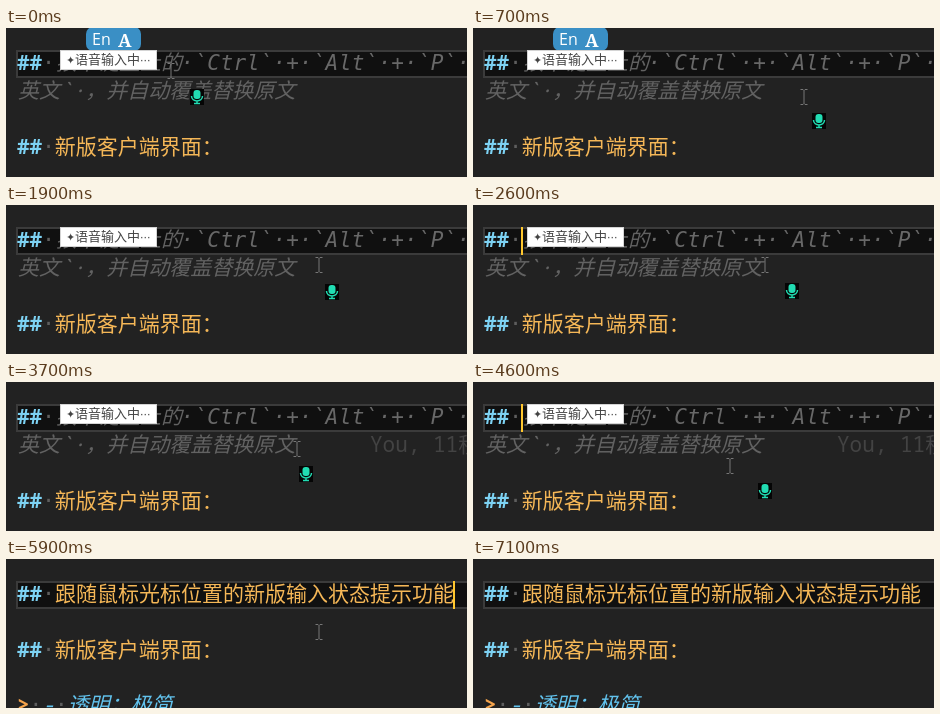
These frames come from a looping animation (461x149 px, 7.2 s). An HTML page:

```html
<!DOCTYPE html>
<html lang="zh-CN">
<head>
<meta charset="utf-8">
<title>Voice input status</title>
<style>
  html, body { margin: 0; width: 100%; height: 100%; overflow: hidden; background: #222; }
  svg { display: block; width: 461px; height: 149px; }
  text { font: 21px "Noto Sans Mono", "Noto Sans CJK SC", "Noto Sans Mono CJK SC", monospace; white-space: pre; }
  .mark { font-weight: bold; fill: #7dd2f3; }
  .dot { font-family: "DejaVu Sans Mono", monospace; fill: #5e5e5e; }
  .head { fill: #f5b757; }
  .note { fill: #626262; font-style: italic; }
  .keys { font-family: "DejaVu Sans Mono", monospace; fill: #686868; letter-spacing: .5px; }
  .blame { fill: #434343; }
  .list { fill: #62c3ee; font-style: italic; }
  .quote { fill: #f5a44c; font-weight: bold; }
  .tip { font: 13px "Noto Sans CJK SC", sans-serif; fill: #444; }
  .sign { font: 11px "DejaVu Sans", sans-serif; fill: #444; }
  .lang { font: 16px "Open Sans", sans-serif; fill: #fff; }
  .face { font: bold 18px "Noto Serif", serif; fill: #fff; }
</style>
</head>
<body>
<svg viewBox="0 0 461 149">
  <rect width="461" height="149" fill="#222"/>
  <rect x="11" y="23" width="460" height="26" fill="#101010" stroke="#3b3b3b" stroke-width="2"/>
  <text x="11" y="42"><tspan class="mark">##</tspan><tspan class="dot">·</tspan></text>

  <g id="before">
    <text class="note" x="50" y="42">按下键盘上的</text>
    <text class="note keys" x="175" y="42">·`Ctrl`·+·`Alt`·+·`P`·</text>
    <text class="note" x="12" y="70">英文`·，并自动覆盖替换原文</text>
    <text class="blame" id="blame" x="364" y="70">You, 11秒钟前</text>
    <text x="11" y="126"><tspan class="mark">##</tspan><tspan class="dot">·</tspan><tspan class="head">新版客户端界面：</tspan></text>
  </g>

  <g id="after">
    <text class="head" x="49" y="42">跟随鼠标光标位置的新版输入状态提示功能</text>
    <text x="11" y="98"><tspan class="mark">##</tspan><tspan class="dot">·</tspan><tspan class="head">新版客户端界面：</tspan></text>
    <text x="11" y="153"><tspan class="quote">&gt;</tspan><tspan class="dot">·</tspan><tspan class="list">-</tspan><tspan class="dot">·</tspan><tspan class="list">透明；极简</tspan></text>
  </g>

  <rect id="caret" y="22" width="2" height="28" fill="#ffc72e"/>

  <g id="badge">
    <rect x="80" y="-1" width="55" height="24" rx="7" fill="#3a8fc5"/>
    <text class="lang" x="86" y="17">En</text>
    <text class="face" x="112" y="19">A</text>
  </g>

  <g id="tip">
    <rect x="54.5" y="22.5" width="96" height="19" fill="#fff" stroke="#d4d4d4"/>
    <text class="sign" x="60" y="36">✦</text>
    <text class="tip" x="69" y="36">语音输入中</text>
    <text class="sign" x="134" y="36">···</text>
  </g>

  <path id="beam" d="M-3.5-7.5H-1L0-6.5 1-7.5H3.5M0-6.5V6.5M-3.5 7.5H-1L0 6.5 1 7.5H3.5" fill="none" stroke="#777"/>

  <g id="mic">
    <rect x="-7" y="-8" width="14" height="16" fill="#050505"/>
    <rect x="-3.5" y="-7" width="7" height="9" rx="3" fill="#21dcb2"/>
    <path d="M-5.5-1C-5.5 5.500 5.5 5.5 5.5-1M0 4V6.5M-3 6.5H3" fill="none" stroke="#21dcb2" stroke-width="1.5"/>
  </g>
</svg>
<script>
  const LOOP = 7200, STEP = 100, DONE = 5900, LAG = 100;
  const el = id => document.getElementById(id);

  // Turning points of the mouse: seconds, x, y
  const turns = [
    [.1, 165, 43], [.7, 331, 69], [1.25, 238, 70], [2.1, 324, 58],
    [2.55, 292, 60], [3.45, 263, 66], [4.1, 349, 69], [4.6, 257, 84],
    [5.35, 313, 73], [6.1, 313, 73], [6.5, 375, 138]
  ];

  // Ease from one turning point to the next
  function mouse(ms) {
    const s = ms / 1000;
    const next = turns.findIndex(p => p[0] > s);
    if (next < 1) return turns.at(next).slice(1);
    const [t0, x0, y0] = turns[next - 1], [t1, x1, y1] = turns[next];
    const k = (1 - Math.cos(Math.PI * (s - t0) / (t1 - t0))) / 2;
    return [x0 + (x1 - x0) * k, y0 + (y1 - y0) * k];
  }

  function show(id, on) {
    el(id).setAttribute("visibility", on ? "inherit" : "hidden");
  }

  function place(id, x, y) {
    el(id).setAttribute("transform", `translate(${Math.round(x)} ${Math.round(y)})`);
  }

  function caretOn(t) {
    if (t >= DONE) return t < 7100 && (t - DONE) % 1000 < 500;
    return (t + 800) % 1000 < 500;
  }

  function draw(now) {
    const t = Math.floor(now % LOOP / STEP) * STEP;
    const typing = t < DONE;
    for (const id of ["before", "tip", "mic"]) show(id, typing);
    show("after", !typing);
    show("blame", typing && t >= 3500);
    show("badge", t < 1500 || (typing && t >= 5600));
    show("beam", t < 6600);
    show("caret", caretOn(t));
    el("caret").setAttribute("x", typing ? 48 : 447);

    const [x, y] = mouse(t), [mx, my] = mouse(t - LAG);
    place("beam", x, y);
    place("mic", mx + 26, my + 26);
  }

  const start = performance.now();
  function tick() {
    draw(performance.now() - start);
    requestAnimationFrame(tick);
  }
  tick();
</script>
</body>
</html>
```
